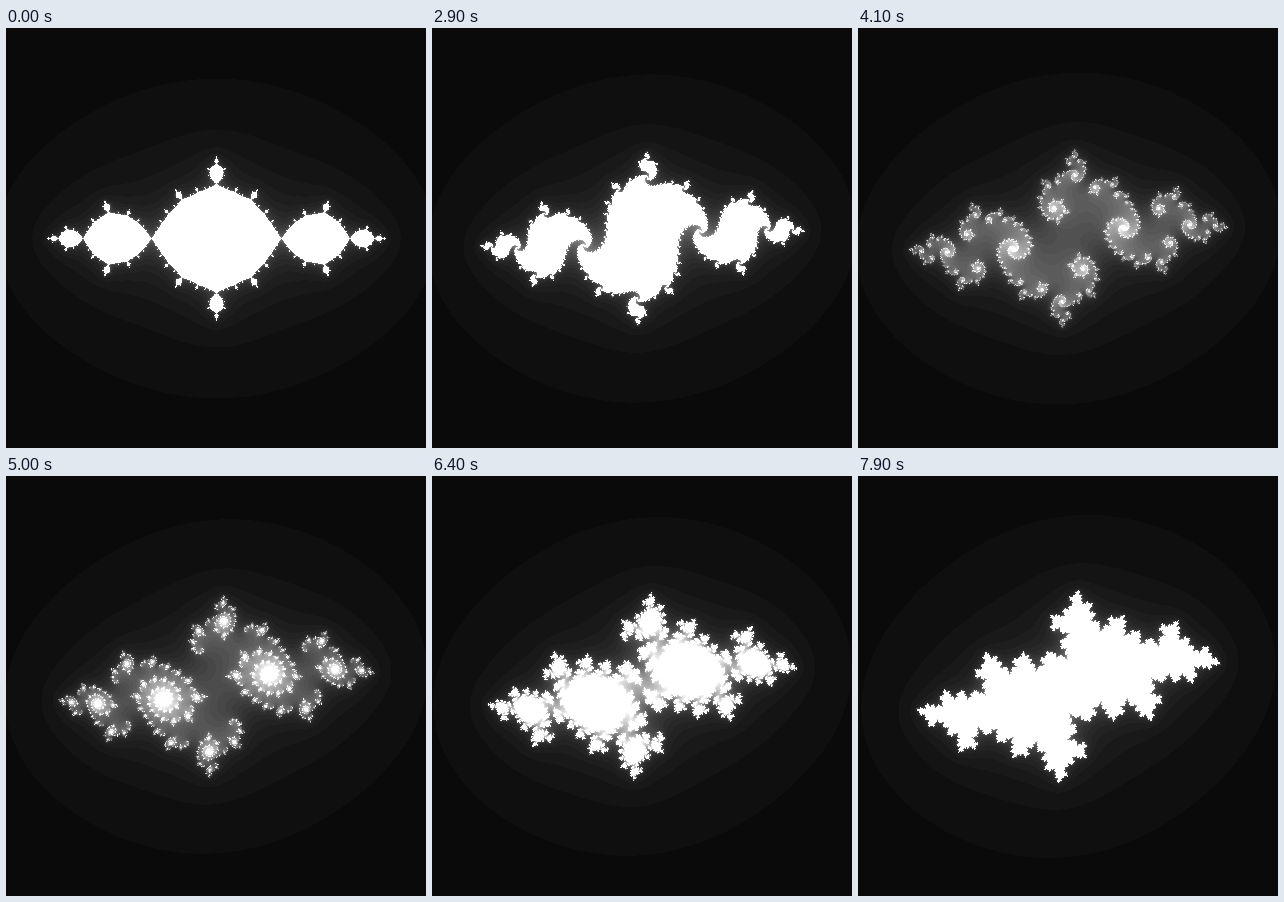
An HTML page with a canvas for the animation above (8000 ms loop, 420 by 420 pixels).

```html
<!DOCTYPE html>
<html lang="en">
<head>
<meta charset="utf-8">
<title>Julia set</title>
<style>
  html, body { margin: 0; width: 100%; height: 100%; overflow: hidden; background: #0a0a0a; }
  canvas { display: block; width: 420px; height: 420px; }
</style>
</head>
<body>
<canvas id="stage" width="420" height="420"></canvas>
<script>
const SIZE = 420, HALF = SIZE / 2, UNIT = SIZE / 4;
const STEP_MS = 100, STEPS = 80;
const MAX_ITER = 50, BAILOUT = 10;
const C_STEP = 0.005;

const ctx = document.getElementById('stage').getContext('2d');
const image = ctx.createImageData(SIZE, SIZE);
const pixels = new Uint32Array(image.data.buffer);

// Opaque grey for each iteration count, black to white
const shades = Array.from({ length: MAX_ITER + 1 }, (_, n) => {
  const v = Math.floor(255 * n / MAX_ITER);
  return (0xff000000 | v << 16 | v << 8 | v) >>> 0;
});

function escapeTime(x, y, cx, cy) {
  let n = 0, xx = x * x, yy = y * y;
  while (n < MAX_ITER && xx + yy < BAILOUT * BAILOUT) {
    y = 2 * x * y + cy;
    x = xx - yy + cx;
    xx = x * x;
    yy = y * y;
    n++;
  }
  return n;
}

// The constant moves on a straight line from -1 towards i
function draw(step) {
  const cx = -1 + C_STEP * step, cy = C_STEP * step;
  for (let py = 0, i = 0; py < SIZE; py++) {
    const y = (py - HALF) / UNIT;
    for (let px = 0; px < SIZE; px++) {
      pixels[i++] = shades[escapeTime((px - HALF) / UNIT, y, cx, cy)];
    }
  }
  ctx.putImageData(image, 0, 0);
}

const start = performance.now();
let shown = -1;

function tick() {
  const step = Math.floor((performance.now() - start) / STEP_MS) % STEPS;
  if (step !== shown) draw(shown = step);
  requestAnimationFrame(tick);
}
tick();
</script>
</body>
</html>
```
